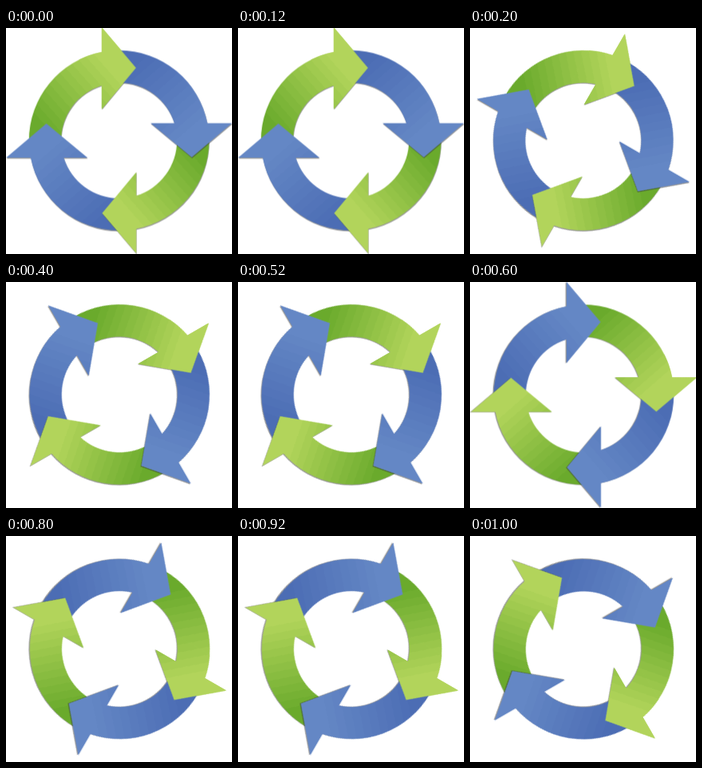
Recreate the animation shown at these times as an HTML page. Size 283 px wide and 283 px high, loop 1200 ms.

```html
<!DOCTYPE html>
<html lang="en">
<head>
<meta charset="utf-8">
<title>Cycle arrows</title>
<style>
  html, body { margin: 0; width: 100%; height: 100%; overflow: hidden; background: #fff; }
  svg { display: block; width: 100vw; height: 100vh; }
  #spin { animation: spin 1.2s steps(6, end) infinite; transform-origin: 0 0; }
  @keyframes spin { to { transform: rotate(180deg); } }
</style>
</head>
<body>
<svg viewBox="0 0 283 283">
  <defs>
    <linearGradient id="green" gradientUnits="userSpaceOnUse" x1="-106" y1="-20" x2="-13" y2="-101"></linearGradient>
    <linearGradient id="blue" gradientUnits="userSpaceOnUse" x1="-106" y1="-20" x2="-13" y2="-101"></linearGradient>
    <path id="arrow" d="M-112.8 0A112.8 112.8 0 0 1-21.6-110.7V-141.4L21.2-91L-21.6-39.5V-69.2A72.5 72.5 0 0 0-72.5 0Z"/>
    <clipPath id="front"><rect x="-50" y="-150" width="90" height="130"/></clipPath>
  </defs>
  <g transform="translate(141.8 141.4)">
    <g id="spin"><g id="ring" transform="translate(-.25 -.6)"></g></g>
  </g>
</svg>
<script>
  const NS = 'http://www.w3.org/2000/svg';
  const ring = document.getElementById('ring');

  function add(parent, tag, attrs) {
    const el = document.createElementNS(NS, tag);
    for (const key in attrs) el.setAttribute(key, attrs[key]);
    return parent.appendChild(el);
  }

  // Stepped colour bands from tail to head
  function bands(id, from, to, count) {
    const gradient = document.getElementById(id);
    for (let i = 0; i < count; i++) {
      const mix = from.map((v, c) => Math.round(v + (to[c] - v) * i / (count - 1)));
      for (const edge of [i, i + 1]) {
        add(gradient, 'stop', { offset: edge / count, 'stop-color': `rgb(${mix})` });
      }
    }
  }

  function arrow(turn) {
    const spin = `rotate(${turn * 90})`;
    add(ring, 'use', {
      href: '#arrow', transform: `translate(.4 1.2) ${spin}`,
      fill: '#333', 'fill-opacity': .5
    });
    add(ring, 'use', {
      href: '#arrow', transform: spin, fill: turn % 2 ? 'url(#blue)' : 'url(#green)'
    });
  }

  bands('green', [106, 170, 44], [178, 212, 91], 13);
  bands('blue', [76, 109, 180], [100, 135, 197], 12);

  // Each head overlaps the next tail, so the first head is laid over again last
  [0, 3, 2, 1].forEach(arrow);
  add(ring, 'use', { href: '#arrow', fill: 'url(#green)', 'clip-path': 'url(#front)' });
</script>
</body>
</html>
```
